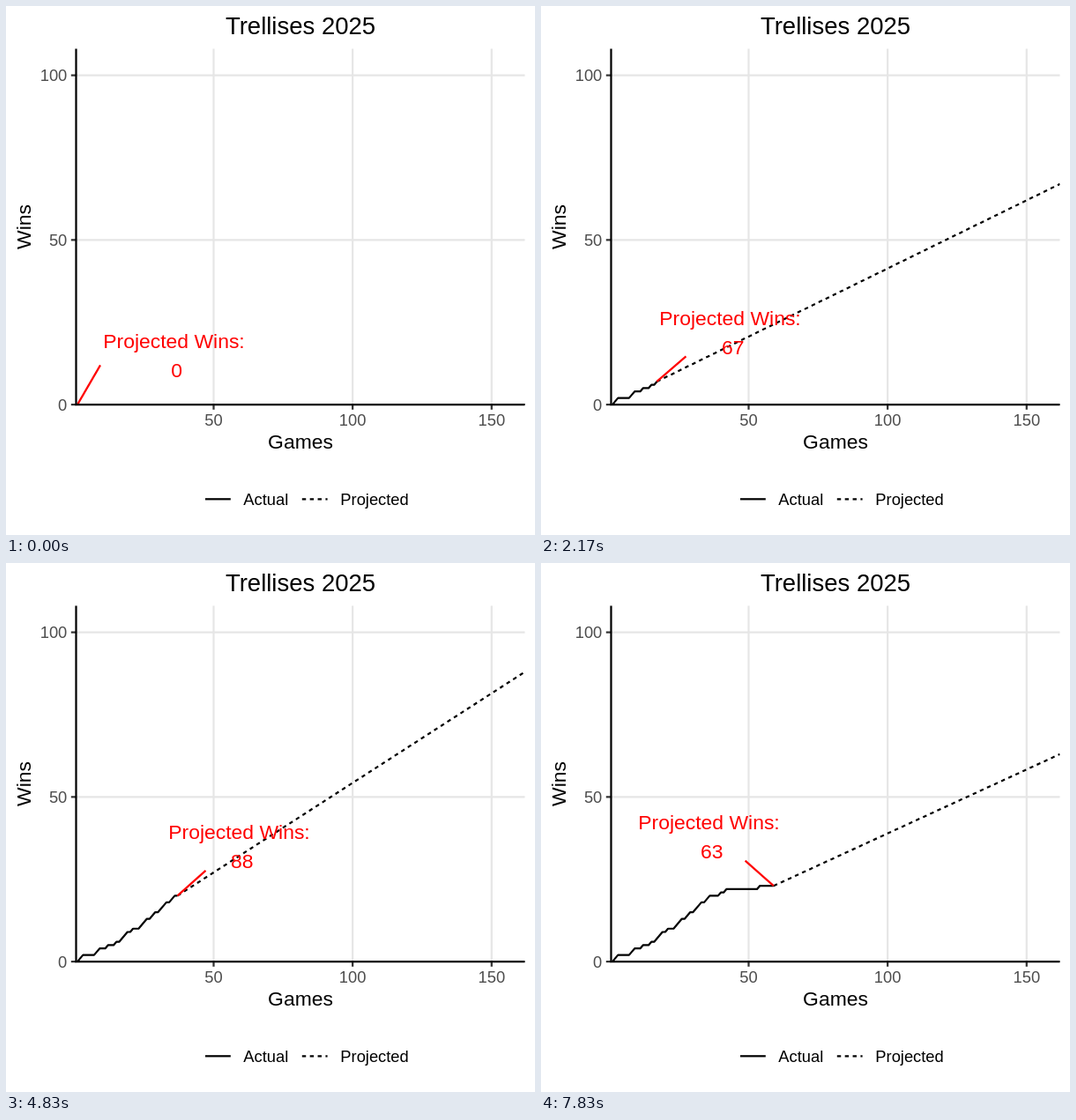
Recreate the animation shown at these times as an HTML page. Size 600 by 600 pixels, loop 8 s.

```html
<!DOCTYPE html>
<html lang="en">
<head>
<meta charset="utf-8">
<title>Projected wins</title>
<style>
  html, body { margin: 0; width: 100%; height: 100%; overflow: hidden; background: #fff; }
  svg { display: block; width: 100%; height: 100%; }
  text { font: 22.92px "Liberation Sans", Arial, sans-serif; text-anchor: middle; }
  .title { font-size: 27.5px; }
  .small { font-size: 18.33px; }
  .tick { fill: #4d4d4d; }
  .end { text-anchor: end; }
  .start { text-anchor: start; }
  .line { fill: none; stroke: #000; stroke-width: 2.22; stroke-linejoin: round; }
  .dashed { stroke-dasharray: 4.44; }
  .grid { stroke: #e6e6e6; }
  .mark { stroke: #333; }
  .red { stroke: #f00; }
  .label { fill: #f00; }
</style>
</head>
<body>
<svg viewBox="0 0 600 600">
  <clipPath id="panel"><rect x="79.5" y="48.5" width="509" height="403.6"/></clipPath>
  <g id="grid"></g>
  <g clip-path="url(#panel)">
    <path id="projected" class="line dashed"/>
    <path id="actual" class="line"/>
  </g>
  <path id="leader" class="line red"/>
  <text id="caption" class="label">Projected Wins:</text>
  <text id="value" class="label"></text>
  <g id="ticks"></g>
  <path class="line" d="M79.5 48.5V453.2M79.5 452.1H588.5"/>
  <text class="title" x="334" y="32">Trellises 2025</text>
  <text x="334" y="502">Games</text>
  <text transform="translate(27.5 250.5) rotate(-90)">Wins</text>
  <path class="line" d="M226 559.3H254.8"/>
  <text class="small start" x="269.3" y="566">Actual</text>
  <path class="line dashed" d="M335.8 559.3H364.6"/>
  <text class="small start" x="379.3" y="566">Projected</text>
</svg>
<script>
const SEASON = 162, LOOP = 8000, STEPS = 48;
const GAMES_PER_STEP = 161 / 131;
const RESULTS = "LWWLLLLWWLLWLLWLWWWLWLLWWWLWWLWWWLWWLLLWLWLLLLLLLLLLLWLLLLL";

// Horizontal centre of the label at certain games, linear in between.
const LABEL_X = [[1, 190.5], [8, 202], [17, 214.5], [24, 230], [27, 242], [32, 252],
  [40, 272], [42, 190.3], [43, 190.5], [44, 206.8], [53, 235], [54, 190.5], [59, 190.5]];

const byId = id => document.getElementById(id);
const px = game => 77.85 + 3.153 * game;
const py = wins => 452.1 - 3.735 * wins;
const clamp = (v, lo, hi) => Math.min(Math.max(v, lo), hi);

let total = 0;
const wins = [...RESULTS].map(r => total += r === "W" ? 1 : 0);

function drawAxes() {
  let grid = "", ticks = "";
  for (const v of [0, 50, 100, 150]) {
    const x = px(v), y = py(v);
    if (v) {
      grid += `<path class="line grid" d="M${x} 48.5V452"/>`;
      ticks += `<path class="line mark" d="M${x} 452V457.8"/>
        <text class="small tick" x="${x}" y="476">${v}</text>`;
    }
    if (v < 150) {
      grid += `<path class="line grid" d="M79.5 ${y}H588.5"/>`;
      ticks += `<path class="line mark" d="M73.8 ${y}H79.5"/>
        <text class="small tick end" x="69.3" y="${y + 6.7}">${v}</text>`;
    }
  }
  byId("grid").innerHTML = grid;
  byId("ticks").innerHTML = ticks;
}

function labelX(game) {
  const i = Math.max(1, LABEL_X.findIndex(([g]) => g >= game));
  const [g0, x0] = LABEL_X[i - 1], [g1, x1] = LABEL_X[i];
  return x0 + (x1 - x0) * (game - g0) / (g1 - g0);
}

// Nearest point of the label box, pulled toward the middle of that side.
function leaderEnd(x, y, cx, cy) {
  const dist = (u, v) => Math.hypot(x - u, (y - v) * 509 / 403.6);
  let ex = clamp(x, cx - 83.5, cx + 83.5);
  let ey = clamp(y, cy - 27.5, cy + 27.5);
  const near = dist(ex, ey), toMidX = dist(cx, ey), toMidY = dist(ex, cy);
  if (ex === x || toMidX < toMidY) ex += (cx - ex) * near / toMidX;
  else ey += (cy - ey) * near / toMidY;
  return `${ex} ${ey}`;
}

function place(id, x, y) {
  byId(id).setAttribute("x", x);
  byId(id).setAttribute("y", y);
}

function draw(time) {
  const step = Math.min(STEPS - 1, Math.floor((time % LOOP + 4) * STEPS / LOOP));
  const game = Math.floor(1 + (step + 0.5) * GAMES_PER_STEP);
  const won = wins[game - 1];
  const forecast = Math.round(won / game * SEASON);
  const x = px(game), y = py(won), cx = labelX(game);

  const track = wins.slice(0, game).map((w, i) => `${px(i + 1)} ${py(w)}`);
  byId("actual").setAttribute("d", "M" + track.join("L"));
  byId("projected").setAttribute("d", `M${x} ${y}L${px(SEASON)} ${py(forecast)}`);
  byId("leader").setAttribute("d", `M${x} ${y}L${leaderEnd(x, y, cx, y - 56)}`);
  place("caption", cx, y - 64);
  place("value", cx + 3.2, y - 31);
  byId("value").textContent = forecast;
}

const start = performance.now();
function tick() {
  draw(performance.now() - start);
  requestAnimationFrame(tick);
}
drawAxes();
tick();
</script>
</body>
</html>
```
